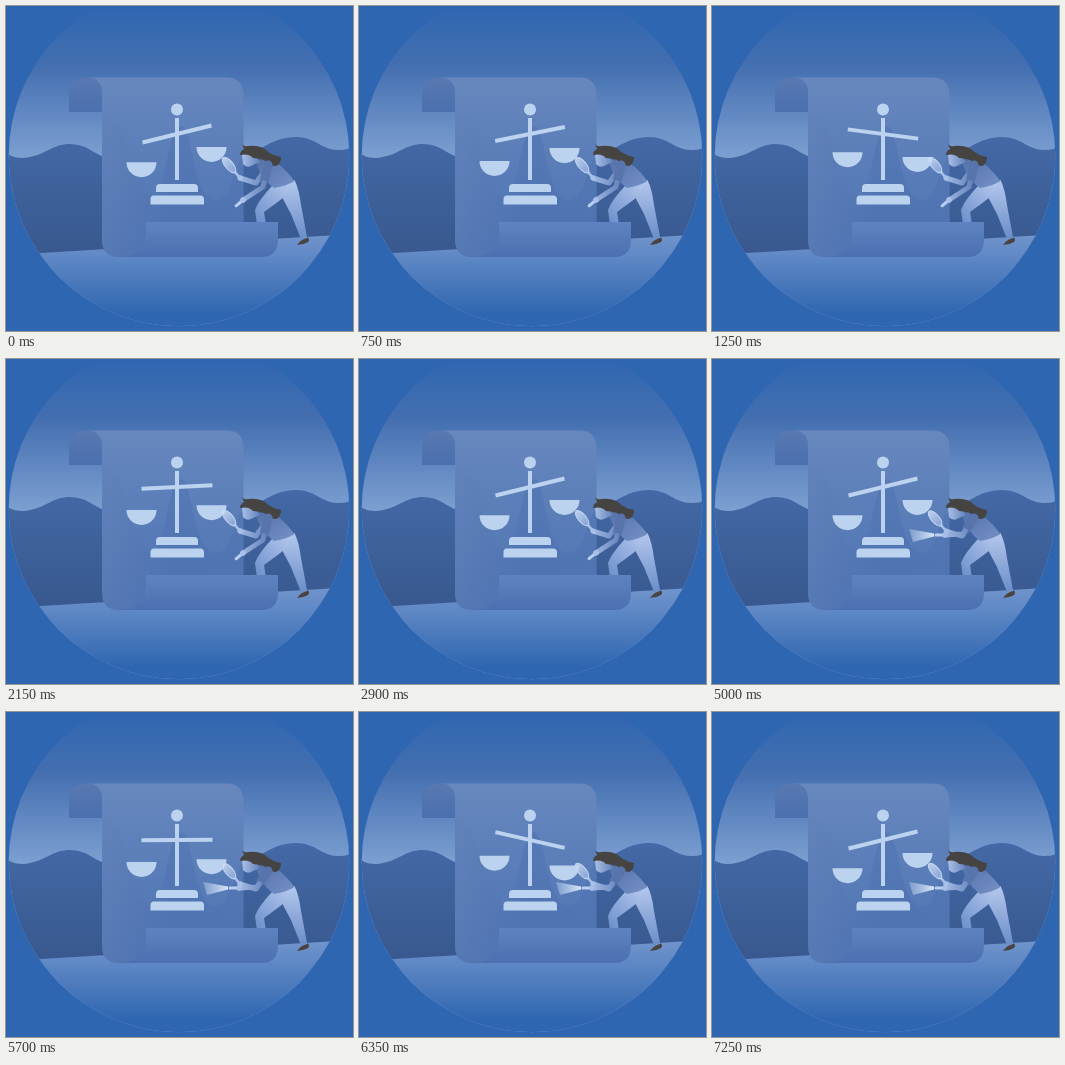
An HTML page that plays this animation: 347x325 px, repeating every 7750 ms.

```html
<!DOCTYPE html>
<html lang="en">
<head>
<meta charset="utf-8">
<title>Scales on a scroll</title>
<style>
html, body { margin: 0; width: 100%; height: 100%; overflow: hidden; background: #2f66b1; }
svg { display: block; width: 347px; height: 325px; }
.limb { fill: none; stroke-linecap: round; stroke-linejoin: round; }
</style>
</head>
<body>
<svg viewBox="0 0 347 325">
  <defs>
    <clipPath id="disc"><circle cx="173" cy="150" r="170.300"/></clipPath>
    <linearGradient id="sky" gradientUnits="userSpaceOnUse" x1="0" y1="0" x2="0" y2="152">
      <stop stop-color="#2f66b1"/><stop offset=".4" stop-color="#446fb0"/><stop offset="1" stop-color="#7da0d2"/>
    </linearGradient>
    <linearGradient id="hills" x2="0" y2="1"><stop stop-color="#4369a6"/><stop offset="1" stop-color="#37568c"/></linearGradient>
    <linearGradient id="ground" gradientUnits="userSpaceOnUse" x1="0" y1="230" x2="0" y2="308">
      <stop stop-color="#7094cc"/><stop offset="1" stop-color="#2f66b1"/>
    </linearGradient>
    <linearGradient id="paper" x2="0" y2="1"><stop stop-color="#6787be"/><stop offset="1" stop-color="#4c73b2"/></linearGradient>
    <linearGradient id="curl" x2="0" y2="1"><stop stop-color="#5878b2"/><stop offset="1" stop-color="#4a70ae"/></linearGradient>
    <linearGradient id="roll" x2="0" y2="1"><stop stop-color="#5e83c0"/><stop offset="1" stop-color="#4a70b0"/></linearGradient>
    <linearGradient id="wave">
      <stop stop-color="#6381b8" stop-opacity=".45"/><stop offset=".5" stop-color="#4a6eae" stop-opacity=".4"/><stop offset="1" stop-color="#4a6eac" stop-opacity=".35"/>
    </linearGradient>
    <linearGradient id="rearLeg" x2="0" y2="1"><stop stop-color="#b4c8ec"/><stop offset="1" stop-color="#6a8dca"/></linearGradient>
    <linearGradient id="frontLeg" x1="1" x2=".2" y2="1"><stop stop-color="#b4c8ec"/><stop offset="1" stop-color="#6f92ce"/></linearGradient>
    <linearGradient id="shirt" x2="1" y2="1"><stop stop-color="#5470a8"/><stop offset="1" stop-color="#7591c8"/></linearGradient>
    <linearGradient id="skin"><stop stop-color="#a8bfe6"/><stop offset="1" stop-color="#6482ba"/></linearGradient>
    <linearGradient id="arm" gradientUnits="userSpaceOnUse" x1="230" y1="0" x2="264" y2="0">
      <stop stop-color="#a8c0e8"/><stop offset="1" stop-color="#607db6"/>
    </linearGradient>
    <linearGradient id="beamFill"><stop stop-color="#c5d8f3" stop-opacity=".35"/><stop offset="1" stop-color="#d8e6fa"/></linearGradient>
    <linearGradient id="glass"><stop stop-color="#d7e4f8"/><stop offset="1" stop-color="#8eabdc"/></linearGradient>
  </defs>

  <g clip-path="url(#disc)">
    <path fill="url(#sky)" d="M0 0H347V325H0Z"/>
    <path fill="url(#hills)" d="M0 147C8 152 16 153 24 151C40 148 47 138 64 138C80 138 87 147 98 151H236C252 147 266 131 290 131C309 131 316 144 332 144Q340 144 347 141V260H0Z"/>
    <path fill="url(#ground)" d="M0 249L347 228V325H0Z"/>
  </g>

  <path fill="url(#paper)" d="M80 71.500H220Q237.500 71.500 237.500 89V251H113Q96 251 96 234V88Q96 71.500 80 71.500Z"/>
  <path fill="url(#wave)" d="M96 112C110 103 115 125 121 146C128 172 134 193 146 191C161 188 161 120 175 120C187 120 187 193 209 194C227 194 226 160 237.500 150V251H113Q96 251 96 234Z"/>
  <path fill="url(#curl)" d="M63 106V88Q63 71.500 80 71.500Q96 71.500 96 88V106Z"/>

  <g fill="#bcd3f0">
    <circle cx="171" cy="103.5" r="6"/>
    <path d="M169 112H173V174H169Z"/>
    <path d="M150 186V182Q150 178 154 178H188Q192 178 192 182V186Z"/>
    <path d="M144.500 198.500V193Q144.500 189.500 148 189.500H194Q198 189.500 198 193V198.500Z"/>
    <path id="bar" d="M135.500 126H206.500V130H135.500Z"/>
    <path id="panL" d="M120.500 0H150.500A15 15 0 0 1 120.500 0Z"/>
    <path id="panR" d="M190.500 0H220.500A15 15 0 0 1 190.500 0Z"/>
  </g>

  <g id="lensArm">
    <path id="lensLimb" class="limb" stroke="url(#arm)" stroke-width="5"/>
    <g id="lens">
      <path class="limb" d="M2 0H-9" stroke="#a9c1e8" stroke-width="2.500"/>
      <ellipse cx="-17" rx="9.500" ry="4" fill="url(#glass)" fill-opacity=".8" stroke="#c3d6f2" stroke-width="1"/>
      <circle r="2.500" fill="#a8c0e8"/>
    </g>
  </g>

  <path fill="url(#rearLeg)" d="M268 180L288.500 174Q293 183 295 199L301 231L295 233L285 208L276 191Z"/>
  <path fill="url(#frontLeg)" d="M266 180L284 176Q284 188 273 195L258 206L260 219H251L249 204Q252 195 266 180Z"/>
  <path fill="#4a4341" d="M291 239Q293 236 296 234L302 231.500Q304 234 302 236Q297 239 291 239Z"/>
  <path fill="url(#shirt)" d="M250 157Q254 151 262 152Q276 158 288.500 175Q281 180 268 182Q261 177 255 168Z"/>
  <path fill="url(#skin)" d="M236 149Q242 145 249 149L254 156L247 159Q241 163 237 158Z"/>
  <path fill="#464443" d="M236 138Q238 141 242 140Q252 139 259 143Q264 149 275 151Q275 158 270 160Q264 160 258 154Q251 152 247 152Q243 147 234 149Q234 145 238 143Z"/>

  <g id="torchArm">
    <path id="sleeve" class="limb" stroke="#5874ad" stroke-width="9"/>
    <path id="forearm" class="limb" stroke="url(#arm)" stroke-width="5"/>
    <g id="torch">
      <path id="beam" fill="url(#beamFill)" d="M-11 -1.500L-36 -6L-32 7L-11 1.500Z"/>
      <path class="limb" d="M0 0H-9" stroke="#b9d0f0" stroke-width="3"/>
      <circle r="2.800" fill="#a8c0e8"/>
    </g>
  </g>

  <path fill="url(#roll)" d="M140 216H272V234Q272 251 255 251H113Q140 250 140 228Z"/>
</svg>
<script>
const LOOP = 7750, STEP = 50, TILT = 13.8, SWING = 2050;
const $ = id => document.getElementById(id);
const set = (id, name, value) => $(id).setAttribute(name, value);
const clamp = x => Math.max(0, Math.min(1, x));
const ease = x => (1 - Math.cos(Math.PI * clamp(x))) / 2;
const span = (t, from, to) => ease((t - from) / (to - from));
const mix = (a, b, k) => a.map((v, i) => v + (b[i] - v) * k);
const line = (...points) => 'M' + points.map(p => p.join(' ')).join('L');
const place = (p, angle) => `translate(${p}) rotate(${angle})`;

// One swing goes over to the other side and back.
const swing = (t, start) => ease(1 - Math.abs((t - start) / (SWING / 2) - 1));

function drawScales(t) {
  const angle = TILT * (2 * (swing(t, 550) + swing(t, 5200)) - 1);
  const drop = 27 * Math.sin(angle * Math.PI / 180);
  set('bar', 'transform', `rotate(${angle} 171 128)`);
  set('panL', 'transform', `translate(0 ${149.7 - drop})`);
  set('panR', 'transform', `translate(0 ${147.4 + drop})`);
}

function drawArms(t) {
  const down = span(t, 2850, 3700) - span(t, 4550, 5050);
  const lensHand = mix([234, 172], [247, 182], down);
  const lensElbow = mix([250, 177], [258, 178], down);
  set('lensLimb', 'd', line([259, 164], lensElbow, lensHand));
  set('lens', 'transform', place(lensHand, 50 - 46 * down));

  const raised = span(t, 2850, 3700);
  const elbow = mix([257, 181], [251, 175], raised);
  const hand = mix([237, 194], [233, 176], raised);
  set('sleeve', 'd', line([262, 159], mix([262, 159], elbow, .65)));
  set('forearm', 'd', line(mix([262, 159], elbow, .8), elbow, hand));
  set('torch', 'transform', place(hand, -40 * (1 - raised)));

  const glow = span(t, 3350, 4350);
  set('beam', 'transform', `translate(-11 0) scale(${glow}) translate(11 0)`);
  set('beam', 'opacity', clamp(2 * glow));
}

function frame() {
  const t = Math.floor(performance.now() % LOOP / STEP) * STEP;
  drawScales(t);
  drawArms(t);
  requestAnimationFrame(frame);
}
frame();
</script>
</body>
</html>
```
